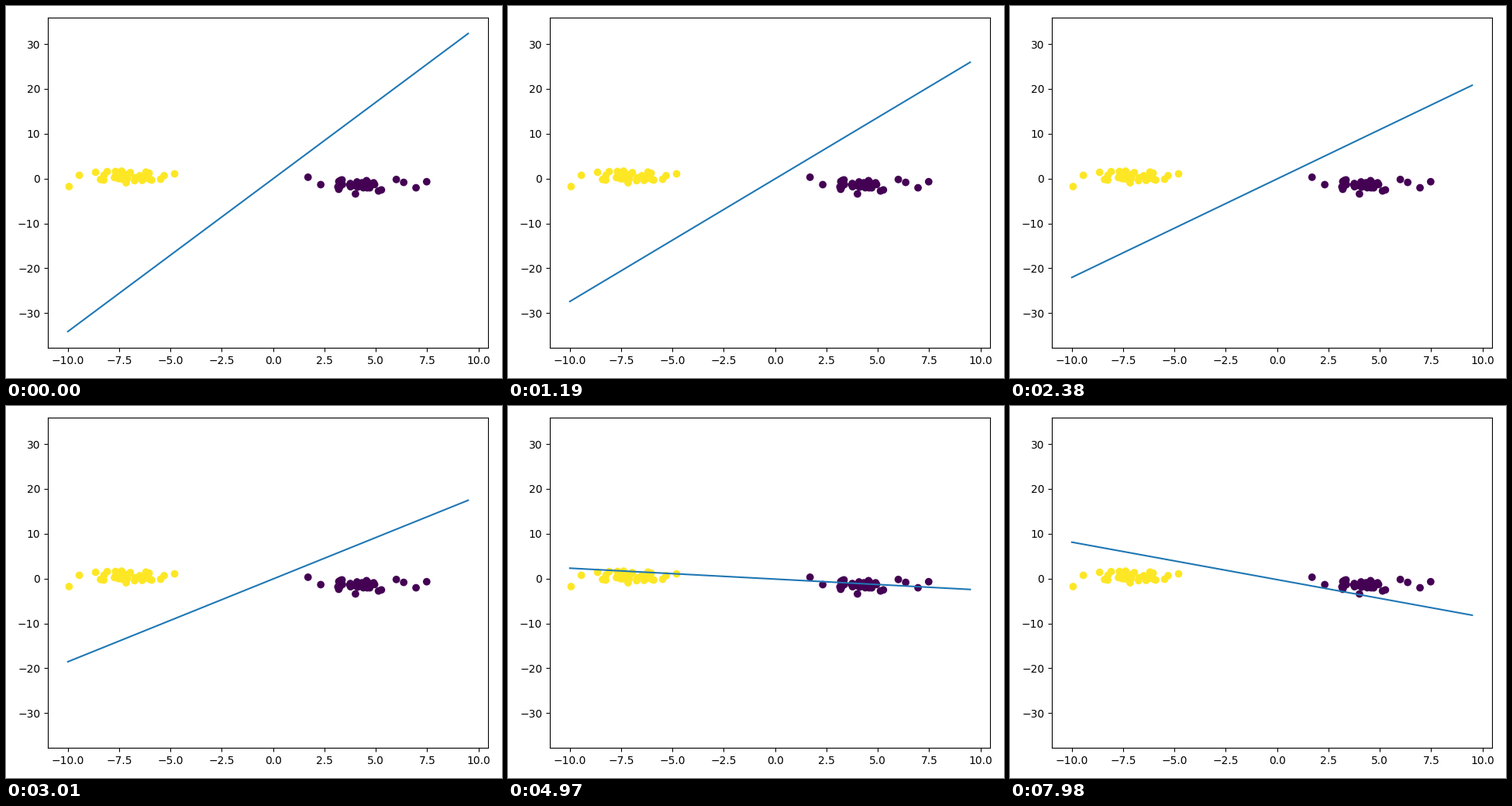
Recreate the animation shown at these times as a matplotlib script. Size 640x480 px, loop 8000 ms.

```python
import numpy as np
import matplotlib.pyplot as plt
from matplotlib.animation import FuncAnimation

LOOP, TICK, STEP = 8000, 20, 70  # ms: loop, redraw interval, one training step
TRAINED = 72                     # the line turns at every step up to here
CORRECTIONS = [74, 78, 86, 87, 114]

rng = np.random.default_rng(4)


def cluster(outliers, x_range, y_range, count=32):
    """A few outliers around a bell-shaped core; ranges are (low, mode, high)."""
    core = np.column_stack([rng.triangular(*x_range, count),
                            rng.triangular(*y_range, count)])
    return np.vstack([outliers, core])


def boundary(step):
    """Slope and intercept of the decision line."""
    slope = np.interp(step, [0, 17, 25, 43, 57, 65, TRAINED],
                      [3.407, 2.735, 2.547, 1.846, 1.063, 0.40, -0.35])
    intercept = -0.03 - 0.0012 * min(step, TRAINED)
    fixes = sum(step >= s for s in CORRECTIONS)
    return slope - 0.097 * fixes, intercept - 0.024 * fixes


yellow = cluster([(-9.94, -1.78), (-9.44, 0.73), (-5.48, -0.15),
                  (-5.31, 0.65), (-4.80, 1.05)],
                 (-9.5, -7.2, -5.6), (-1.4, 0.1, 2.1))
purple = cluster([(1.70, 0.30), (2.32, -1.35), (6.00, -0.20),
                  (6.36, -0.85), (6.96, -2.05), (7.48, -0.70)],
                 (2.5, 4.5, 5.9), (-3.7, -1.4, 0.4))

fig, ax = plt.subplots(figsize=(6.4, 4.8), dpi=100)
points = np.vstack([yellow, purple])
labels = [1] * len(yellow) + [0] * len(purple)
ax.scatter(points[:, 0], points[:, 1], c=labels, cmap="viridis")

xs = np.array([-10, 9.5])
line, = ax.plot(xs, 0 * xs, color="#1f77b4")
ax.set_xlim(-10.975, 10.475)
ax.set_ylim(-37.77, 35.88)
for _ in range(2):  # the second pass settles the right margin
    fig.tight_layout()


def update(frame):
    step = (frame * TICK + TICK // 2) // STEP
    slope, intercept = boundary(step)
    line.set_ydata(slope * xs + intercept)
    return line,


anim = FuncAnimation(fig, update, frames=LOOP // TICK, interval=TICK,
                     repeat=True, repeat_delay=0)
plt.show()
```
